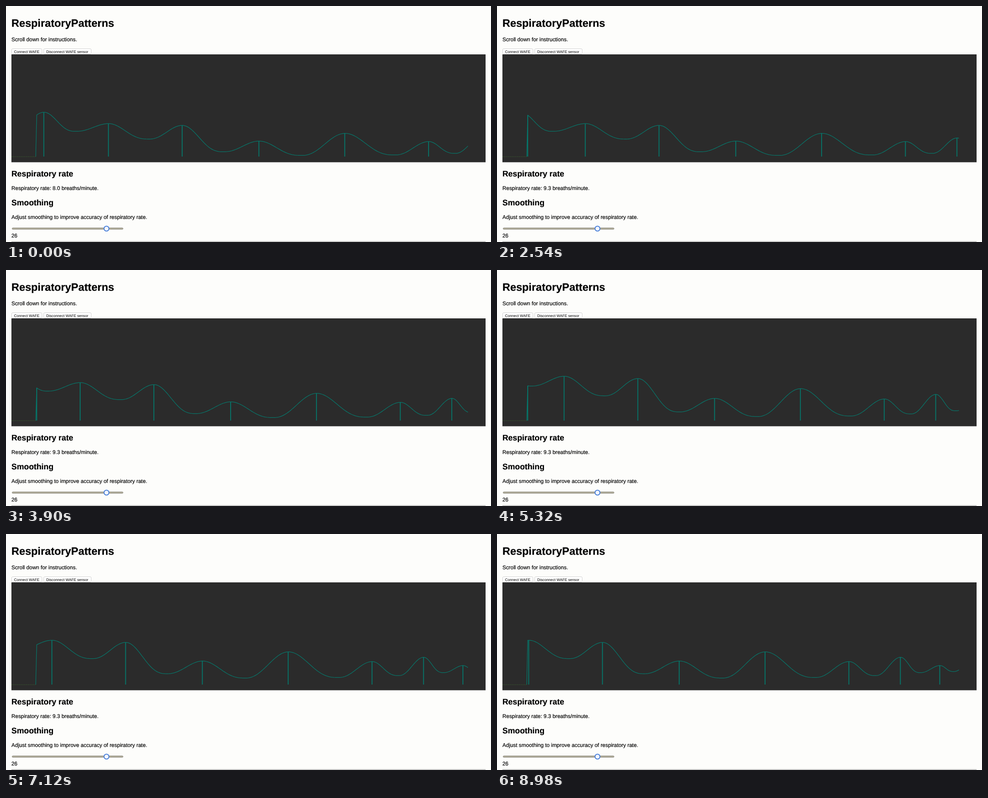
An HTML page that plays this animation: 1073 px wide and 522 px high, repeating every 9 s.

```html
<!DOCTYPE html>
<html lang="en">
<head>
<meta charset="utf-8">
<title>RespiratoryPatterns</title>
<style>
  html, body { margin: 0; width: 100%; height: 100%; overflow: hidden; background: #fdfdfb; }
  svg { display: block; width: 1073px; height: 522px; }
  text {
    font: 11.89px "Liberation Sans", Arial, Helvetica, sans-serif;
    fill: #000; stroke: #000; stroke-width: .2px;
    text-rendering: geometricPrecision;
  }
  .h1 { font-size: 23.78px; font-weight: bold; }
  .h2 { font-size: 17.83px; font-weight: bold; }
  .label { font-size: 8.2px; stroke: none; }
  .button { fill: #fff; stroke: #d2d2d2; }
  .trace { fill: none; stroke: #06766a; stroke-linejoin: round; }
</style>
</head>
<body>
<svg viewBox="0 0 1073 522">
  <text class="h1" x="12" y="46.3">RespiratoryPatterns</text>
  <text x="12" y="78.3">Scroll down for instructions.</text>

  <rect class="button" x="12.5" y="94.5" width="67" height="12" rx="2.5"/>
  <text class="label" x="17.8" y="103.6">Connect WAFE</text>
  <rect class="button" x="83.5" y="94.5" width="105" height="12" rx="2.5"/>
  <text class="label" x="89" y="103.6">Disconnect WAFE sensor</text>

  <rect x="12" y="107" width="1049" height="238.6" fill="#2b2b2b"/>
  <path d="M12 333.3H66" stroke="#38502f" stroke-dasharray="3 1"/>
  <path class="trace" id="curve" stroke-width="1.25"/>
  <path class="trace" id="bars" stroke-width="1.9"/>

  <text class="h2" x="12" y="377">Respiratory rate</text>
  <text x="12" y="406.8">Respiratory rate: <tspan id="rate">8.0</tspan> breaths/minute.</text>
  <text class="h2" x="12" y="441">Smoothing</text>
  <text x="12" y="470.8">Adjust smoothing to improve accuracy of respiratory rate.</text>

  <rect x="13.5" y="490.8" width="245.5" height="3.2" rx="1.6" fill="#b3ae9a" stroke="#85837a" stroke-width=".9"/>
  <circle cx="222.3" cy="492.4" r="5.4" fill="#f6f8fd" stroke="#4a80da" stroke-width="2"/>
  <text x="12" y="511.5">26</text>
  <path d="M12 521H1061" stroke="#8e8e8e"/>
</svg>
<script>
const LOOP = 9000, FIRST = 260, PACKET = 850;
const LEFT = 68, RIGHT = 1022, BASE = 333, TOP = 98;
const COUNT = 427, PER_PACKET = 7, HISTORY = 11;
const STEP = (RIGHT - LEFT) / COUNT;

// Turning points of the breathing signal: [x, height]
const turns = [
  [20, 60], [84, 97.5], [155, 55.5], [227, 72.5], [317, 38.5], [390, 68.5],
  [482, 10.5], [560, 34], [655, 2.5], [750, 51], [861, 3.5], [935.5, 33],
  [994, 7], [1049.3, 41], [1093, 12.5], [1136.7, 25.7], [1167, 14.5], [1200, 28]
];

// Cosine swing between turns; breathing out drops faster than breathing in rises
function signal(x) {
  const i = turns.findIndex(turn => turn[0] > x);
  const [x0, h0] = turns[i - 1], [x1, h1] = turns[i];
  const swing = Math.cos(Math.PI * (x - x0) / (x1 - x0));
  const [low, high] = [Math.min(h0, h1), Math.max(h0, h1)];
  const rising = h1 > h0;
  const level = (rising ? 1 - swing : 1 + swing) / 2;
  return low + (high - low) * level ** (rising ? 1.1 : 1.4);
}

const [curve, bars, rate] = ["curve", "bars", "rate"].map(id => document.getElementById(id));

function draw(packet) {
  const raw = Array.from({ length: COUNT + HISTORY + 1 }, (_, i) =>
    signal(LEFT + (i - HISTORY + packet * PER_PACKET) * STEP));

  // Autoscale to the tallest recent breath while the floor drifts up
  const lift = 1.9 * Math.min(6, Math.max(0, packet - 2));
  const gain = (TOP - lift) / Math.max(...raw);
  const h = raw.slice(HISTORY).map(v => lift + gain * v);

  let line = `M${LEFT - STEP} ${BASE}`, peaks = "";
  h.forEach((v, i) => {
    const at = `${(LEFT + i * STEP).toFixed(2)} ${(BASE - v).toFixed(2)}`;
    line += "L" + at;
    if (v > (h[i - 1] ?? 0) && v >= h[i + 1]) peaks += `M${at}V${BASE}`;
  });
  curve.setAttribute("d", line);
  bars.setAttribute("d", peaks);
  rate.textContent = packet < 2 ? "8.0" : "9.3";
}

let shown = -1;
const start = performance.now();

function tick() {
  const t = (performance.now() - start) % LOOP;
  const packet = Math.max(0, Math.floor((t - FIRST) / PACKET));
  if (packet !== shown) draw(shown = packet);
  requestAnimationFrame(tick);
}
tick();
</script>
</body>
</html>
```
